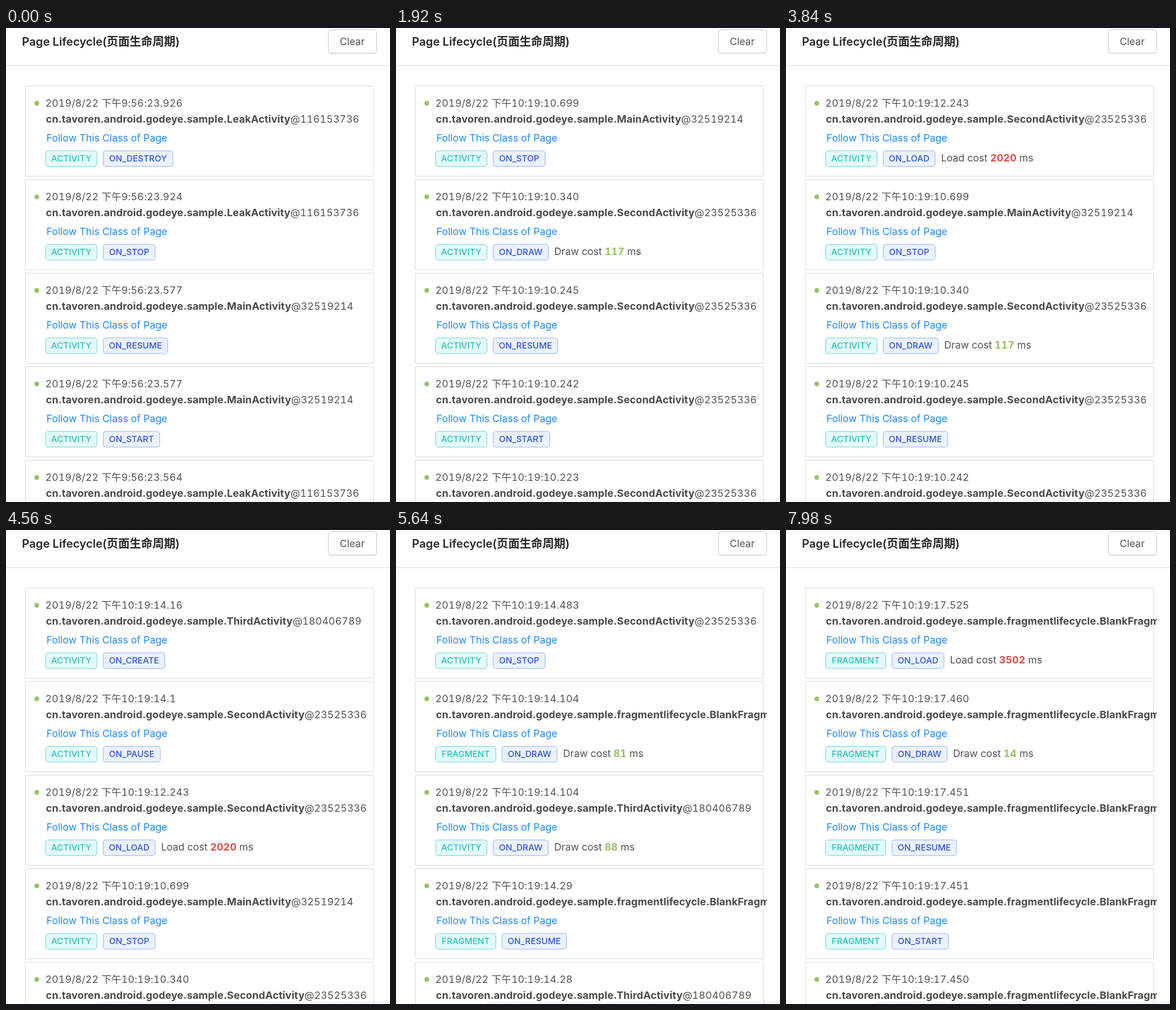
An HTML page that plays this animation: 674 by 831 pixels, repeating every 8000 ms.

```html
<!DOCTYPE html>
<html lang="zh-CN">
<head>
<meta charset="utf-8">
<title>Page Lifecycle</title>
<style>
html, body { margin: 0; width: 100%; height: 100%; overflow: hidden; background: #fff; }
svg { display: block; width: 674px; height: 831px; }
text { font: 17.5px Inter, "Noto Sans CJK SC", "Noto Sans CJK", sans-serif; fill: #525252; white-space: pre; }
.num { font-variant-numeric: tabular-nums; letter-spacing: .2px; }
.name { font-size: 17.9px; font-weight: 700; fill: #4a4a4a; letter-spacing: .13px; }
.link { fill: #1f89f2; }
.tag { font-size: 15px; font-weight: 500; text-anchor: middle; letter-spacing: .08px; }
.title { font-size: 20.1px; font-weight: 600; fill: #262626; }
.card { fill: #fff; stroke: #e2e2e2; stroke-width: 1.4; }
.good { fill: #94c35f; font-weight: 700; }
.bad { fill: #dc4c44; font-weight: 700; }
</style>
</head>
<body>
<svg viewBox="0 0 674 831">
  <defs><clipPath id="pane"><rect width="651" height="831"/></clipPath></defs>
  <rect width="674" height="831" fill="#fff"/>
  <text class="title" x="28" y="31">Page Lifecycle(页面生命周期)</text>
  <rect x="566" y="4.5" width="84.5" height="41" rx="4.5" fill="#ececec"/>
  <rect x="566" y="3" width="84.5" height="41" rx="4.5" fill="#fff" stroke="#d4d4d4" stroke-width="1.4"/>
  <text x="607.6" y="30" text-anchor="middle">Clear</text>
  <path d="M0 65.7H674" stroke="#e4e4e4" stroke-width="1.4"/>
  <g id="list" clip-path="url(#pane)"></g>
  <rect x="156" y="826" width="560" height="30" rx="6" fill="#000" opacity=".03"/>
</svg>
<script>
const LOOP = 8000, PITCH = 164, VISIBLE = 5;
const list = document.getElementById('list');

const pages = {
  Leak: ['LeakActivity', '116153736'],
  Main: ['MainActivity', '32519214'],
  Second: ['SecondActivity', '23525336'],
  Third: ['ThirdActivity', '180406789'],
  Blank: ['fragmentlifecycle.BlankFragment', '74120563']
};
const tagWidth = {
  ACTIVITY: 90, FRAGMENT: 105.5, DESTROY: 122, STOP: 91, RESUME: 113, START: 99,
  DRAW: 96.5, LOAD: 91, CREATE: 108, PAUSE: 100
};

// [shown at ms, clock, page, state, cost], oldest first
const events = [
  [0, '9:56:23.564', 'Leak', 'PAUSE'],
  [0, '9:56:23.577', 'Main', 'START'],
  [0, '9:56:23.577', 'Main', 'RESUME'],
  [0, '9:56:23.924', 'Leak', 'STOP'],
  [0, '9:56:23.926', 'Leak', 'DESTROY'],
  [900, '10:19:10.205', 'Main', 'PAUSE'],
  [900, '10:19:10.223', 'Second', 'CREATE'],
  [900, '10:19:10.242', 'Second', 'START'],
  [900, '10:19:10.245', 'Second', 'RESUME'],
  [1020, '10:19:10.340', 'Second', 'DRAW', 117],
  [1380, '10:19:10.699', 'Main', 'STOP'],
  [2760, '10:19:12.243', 'Second', 'LOAD', 2020],
  [4500, '10:19:14.1', 'Second', 'PAUSE'],
  [4500, '10:19:14.16', 'Third', 'CREATE'],
  [4620, '10:19:14.25', 'Third', 'START'],
  [4620, '10:19:14.27', 'Blank', 'START'],
  [4620, '10:19:14.28', 'Third', 'RESUME'],
  [4620, '10:19:14.29', 'Blank', 'RESUME'],
  [4680, '10:19:14.104', 'Third', 'DRAW', 88],
  [4680, '10:19:14.104', 'Blank', 'DRAW', 81],
  [4980, '10:19:14.483', 'Second', 'STOP'],
  [7860, '10:19:17.450', 'Blank', 'CREATE'],
  [7860, '10:19:17.451', 'Blank', 'START'],
  [7860, '10:19:17.451', 'Blank', 'RESUME'],
  [7860, '10:19:17.460', 'Blank', 'DRAW', 14],
  [7920, '10:19:17.525', 'Blank', 'LOAD', 3502]
];

const digits = s => String(s).replace(/\d+/g, '<tspan class="num">$&</tspan>');

function tag(x, label, width, fill, stroke, color) {
  return `<rect x="${x}" y="215.3" width="${width}" height="27.4" rx="4.5" fill="${fill}" stroke="${stroke}" stroke-width="1.3"/>
    <text class="tag" x="${x + width / 2}" y="234.4" style="fill:${color}">${label}</text>`;
}

function card([, clock, page, state, cost], i) {
  const [name, id] = pages[page];
  const kind = page === 'Blank' ? 'FRAGMENT' : 'ACTIVITY';
  const left = 69.7, x = left + tagWidth[kind] + 11;
  const costText = cost === undefined ? '' :
    `<text x="${x + tagWidth[state] + 10.5}" y="234">${state === 'DRAW' ? 'Draw' : 'Load'} cost <tspan class="num ${cost > 1000 ? 'bad' : 'good'}">${cost}</tspan> ms</text>`;
  return `<g transform="translate(0 ${i * PITCH})">
    <rect class="card" x="34" y="101.7" width="611" height="158" rx="2"/>
    <circle cx="54" cy="132" r="4.2" fill="#94c465"/>
    <text x="69" y="138.4">${digits('2019/8/22 下午' + clock)}</text>
    <text x="70" y="165.8"><tspan class="name">cn.tavoren.android.godeye.sample.${name}</tspan>@${digits(id)}</text>
    <text class="link" x="71" y="199.4">Follow This Class of Page</text>
    ${tag(left, kind, tagWidth[kind], '#e3fafa', '#86dcd9', '#2bc0bd')}
    ${tag(x, 'ON_' + state, tagWidth[state], '#ebf2fe', '#a5bff2', '#2f54d8')}
    ${costText}</g>`;
}

let shown = -1;
function draw(t) {
  const count = events.filter(e => e[0] <= t).length;
  if (count === shown) return;
  shown = count;
  list.innerHTML = events.slice(count - VISIBLE, count).reverse().map(card).join('');
}

const start = performance.now();
function tick() {
  draw((performance.now() - start) % LOOP);
  requestAnimationFrame(tick);
}
draw(0);
tick();
</script>
</body>
</html>
```
